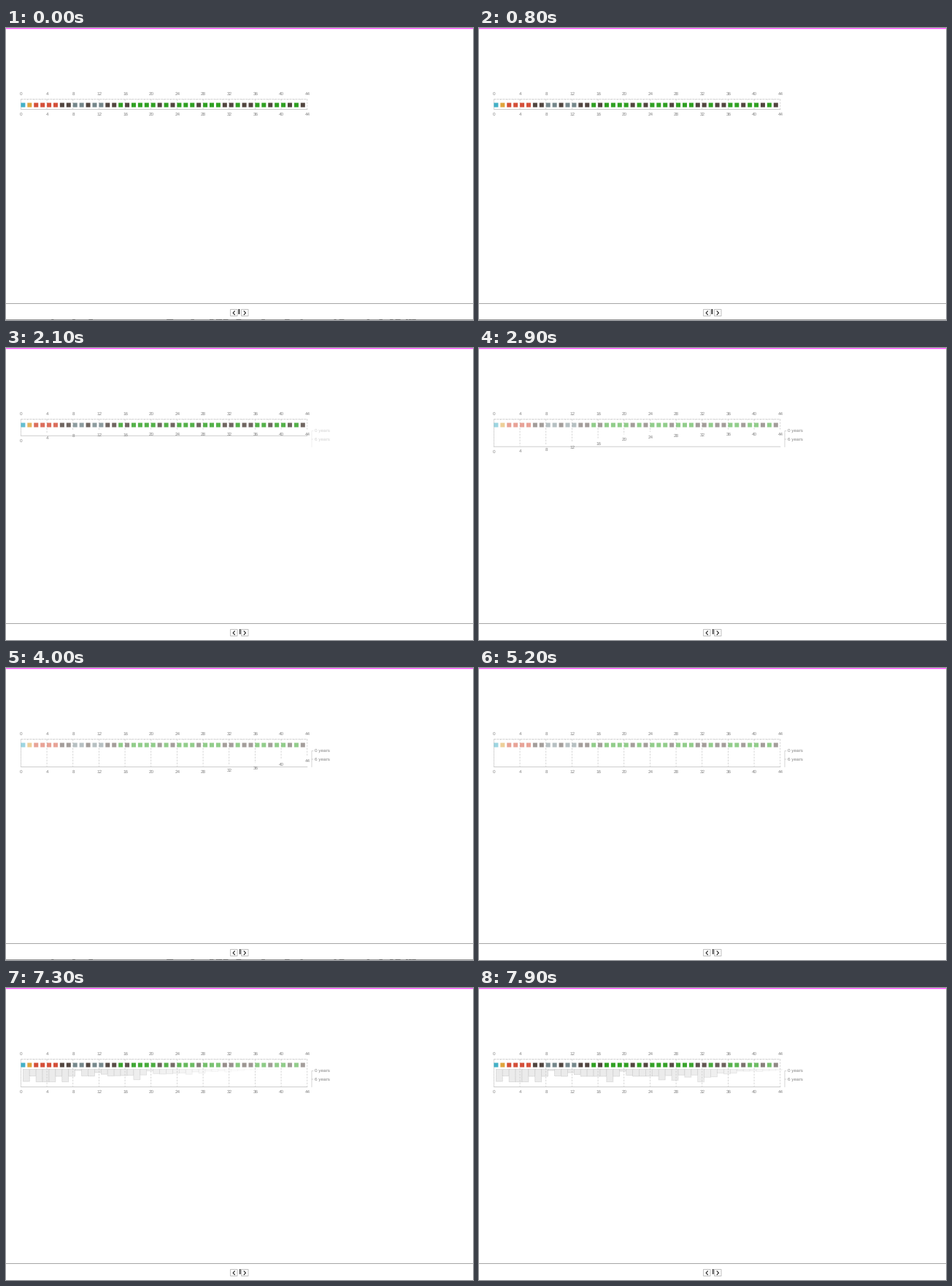
These frames come from a looping animation (640 by 400 pixels, 8 s). A matplotlib script:

```python
import numpy as np
import matplotlib.pyplot as plt
from matplotlib.animation import FuncAnimation
from matplotlib.collections import LineCollection
from matplotlib.patches import Rectangle

# Keep sub-pixel positions and unhinted glyphs
plt.rcParams.update({"path.snap": False, "text.hinting": "none"})

W, H, DPI = 640, 400, 100
FRAMES, STEP = 80, 100
PX = 72 / DPI

YEARS = 44
LEFT, PITCH = 20.4, 8.917
TOP, BOTTOM, DROP = 97.5, 111.5, 24
DURATION, DELAY = 2000, 43.5
AXIS_START, BAR_START = 1200, 5250

COLORS = {"T": "#43b0c6", "A": "#e0a43c", "R": "#d44f39",
          "D": "#51453f", "S": "#75878b", "G": "#2fa022"}
KINDS = "TARRRRDDSSDSSDDGDGGGGDGDGGGDGGGDDGDDGGDGGDGD"
HEIGHTS = [16.5, 9, 17, 17, 17, 9.5, 17, 9.5, 1.5, 9, 9.5, 4.5, 7, 9.5, 9.5,
           9.5, 9.5, 17, 9.5, 2.5, 8, 9.5, 9.5, 9.5, 9.5, 15, 9, 16, 8.5, 12,
           9, 20.5, 13.5, 13.5, 7, 9.5, 8.5, 4, 5, 4.5, 7.5, 5.5, 6, 4]


def ease(start, now):
    """Cubic in-out progress of a transition."""
    t = np.clip((now - start) / DURATION, 0, 1)
    return np.where(t < 0.5, 4 * t**3, 1 - 4 * (1 - t)**3)


fig = plt.figure(figsize=(W / DPI, H / DPI), dpi=DPI, facecolor="white")
ax = fig.add_axes([0, 0, 1, 1])
ax.set_xlim(0, W)
ax.set_ylim(H, 0)
ax.axis("off")


def line(xs, ys, color, width=1, **kw):
    return ax.plot(xs, ys, color=color, lw=width * PX, **kw)[0]


def segments(parts, color, width=1, **kw):
    return ax.add_collection(LineCollection(
        parts, colors=color, linewidths=width * PX, snap=False, **kw))


def box(x, y, w, h, **kw):
    return ax.add_patch(Rectangle((x, y), w, h, snap=False, **kw))


def label(x, y, text, ha="center"):
    return ax.text(x + 0.5, y, text, ha=ha, va="center_baseline",
                   color="#858585", family="Liberation Sans", size=6.4 * PX)


def year_x(year):
    return LEFT + PITCH * year


# Page frame and navigation
box(0, 0, W, 1.3, fc="#ff4cff", lw=0)
line([0, W], [377.5, 377.5], "#a6a6a6")
base = line([0, W], [399.5, 399.5], "#9c9c9c")
rng = np.random.default_rng(4)
starts = rng.uniform(18, 565, 26)
specks = segments([[(x, 399.5), (x + w, 399.5)]
                   for x, w in zip(starts, rng.uniform(2, 7, 26))], "#666666")
for x, side in ((307.5, -1), (322.5, 1)):
    box(x, 385.5, 9.5, 9, fc="white", ec="#c0c0c0", lw=PX)
    mid = x + 4.8
    line([mid - 1.1 * side, mid + 1.2 * side, mid - 1.1 * side],
         [387.9, 390.3, 392.7], "#222222", 1.1)
cursor = box(0, 385, 1.6, 7, fc="#3c3c3c", lw=0)
shadow = box(0, 385, 0.8, 7, fc="#aaaaaa", lw=0)

# Bars, grid and axes
bars = [box(year_x(i) + 2.9, BOTTOM, PITCH, 0, fc="#ebebeb", ec="#c6c6c6",
            lw=0.7 * PX, ls=(0, (2, 1))) for i in range(YEARS)]

marks = np.arange(0, YEARS + 1, 4)
grid = segments([], "#cccccc", 0.8, linestyles=[(0, (3, 2))])
line([year_x(0), year_x(YEARS)], [TOP, TOP], "#d2d2d2", ls=(0, (3, 1)))
segments([[(year_x(i), TOP), (year_x(i), TOP + 1.5)]
          for i in range(YEARS + 1)], "#d8d8d8", 0.7)
axis = line([year_x(0), year_x(YEARS)], [BOTTOM, BOTTOM], "#cdcdcd")
edge = line([year_x(0)] * 2, [TOP, BOTTOM], "#d4d4d4", 0.8)

squares = [box(year_x(i), 102.5, 6, 6, fc=COLORS[k], lw=0, zorder=3)
           for i, k in enumerate(KINDS)]

for m in marks:
    label(year_x(m), 90.2, str(m))
lower = [label(year_x(m), 118.2, str(m)) for m in marks]

legend = [label(422.5, 113, "0 years", "left"),
          label(422.5, 125, "6 years", "left"),
          line([421, 419, 419], [113.5, 113.5, 135.5], "#cccccc", 0.8),
          line([419, 421], [125, 125], "#cccccc", 0.8)]


def draw(frame):
    now = frame * STEP
    first = float(ease(AXIS_START, now))
    drops = DROP * ease(AXIS_START + DELAY * marks, now)
    grow = ease(BAR_START + DELAY * np.arange(YEARS), now)

    axis.set_ydata([BOTTOM + DROP * first] * 2)
    edge.set_ydata([TOP, BOTTOM + DROP * first])
    grid.set_segments([[(year_x(m), TOP), (year_x(m), BOTTOM + d)]
                       for m, d in zip(marks, drops)])
    for text, d in zip(lower, drops):
        text.set_y(118.2 + d)
    for art in legend:
        art.set_alpha(first)

    for square, g in zip(squares, grow):
        square.set_alpha(1 - 0.48 * first * (1 - g))
    for bar, height, g in zip(bars, HEIGHTS, grow):
        bar.set_height(height * g)
        bar.set_alpha(float(g))
        bar.set_visible(g > 0)

    x = 318.4 if now < AXIS_START else 319.9
    cursor.set_x(x)
    shadow.set_x(x + 1.8)
    base.set_visible(now < 1900 or 3700 <= now < 5000)
    specks.set_visible(now < 400 or 3700 <= now < 4500)
    return []


anim = FuncAnimation(fig, draw, frames=FRAMES, interval=STEP, repeat=True,
                     repeat_delay=0, blit=False)
plt.show()
```
